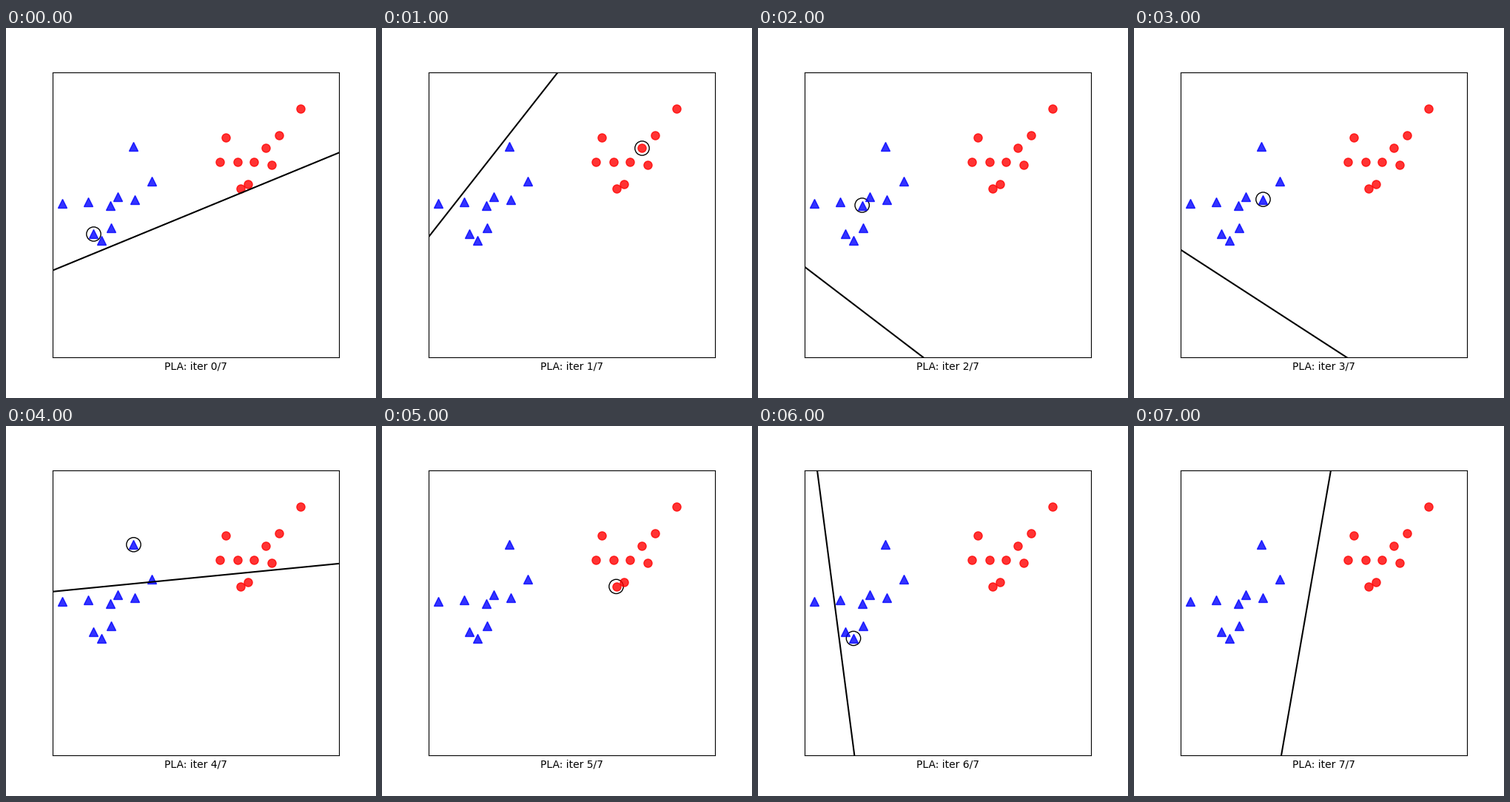
A matplotlib script that plays this animation: 500 px wide and 500 px high, repeating every 10000 ms.

```python
import numpy as np
import matplotlib.pyplot as plt
from matplotlib.animation import FuncAnimation
from matplotlib.patches import Circle

# Stage pixels, y pointing down
BLUE_PX = [(118.48, 278.48), (140.7, 239.52), (174.48, 231.6), (172.48, 160.3), (129, 287),
           (197, 207), (151, 228), (76, 237), (111, 235), (142, 270)]
RED_PX = [(351.48, 162.48), (316.52, 216.9), (398, 109), (369, 145), (297, 148),
          (289, 181), (313, 181), (335, 181), (359, 185), (327, 211)]
VISITS = 'brbbbrb'   # class of the misclassified point taken in each step
START = np.array([-0.327, 0.777, -1.877])
HOLD = 2


def to_data(px):
    u, v = np.array(px, dtype=float).T
    return np.column_stack([(u - 62.5) * 6 / 387.5, (445 - v) * 6 / 385 - 2])


def perceptron(blue, red):
    """Weights after every step, and the point each step corrects."""
    queues = {'b': iter(blue), 'r': iter(red)}
    weights, picked = [START], []
    for kind in VISITS:
        point = next(queues[kind])
        sign = 1 if kind == 'b' else -1
        picked.append(point)
        weights.append(weights[-1] + sign * np.array([1, *point]))
    return weights, picked


def boundary_points(w):
    normal = w[1:]
    foot = -w[0] * normal / (normal @ normal)
    along = np.array([-normal[1], normal[0]]) / np.hypot(*normal)
    return np.array([foot - 20 * along, foot + 20 * along]).T


blue, red = to_data(BLUE_PX), to_data(RED_PX)
weights, picked = perceptron(blue, red)
last = len(picked)

fig, ax = plt.subplots(figsize=(5, 5), dpi=100)
ax.plot(*blue.T, 'b^', markersize=8, alpha=0.8)
ax.plot(*red.T, 'ro', markersize=8, alpha=0.8)
boundary, = ax.plot([], [], 'k')
ring = Circle((0, 0), 0.15, color='k', fill=False)
ax.add_artist(ring)
ax.set(xlim=(0, 6), ylim=(-2, 4), xticks=[], yticks=[])


def update(frame):
    step = min(frame, last)
    boundary.set_data(*boundary_points(weights[step]))
    ring.set_visible(step < last)
    if step < last:
        ring.set_center(picked[step])
    ax.set_xlabel(f'PLA: iter {step}/{last}')
    return boundary, ring


anim = FuncAnimation(fig, update, frames=last + 1 + HOLD, interval=1000,
                     repeat=True, repeat_delay=0)
plt.show()
```
